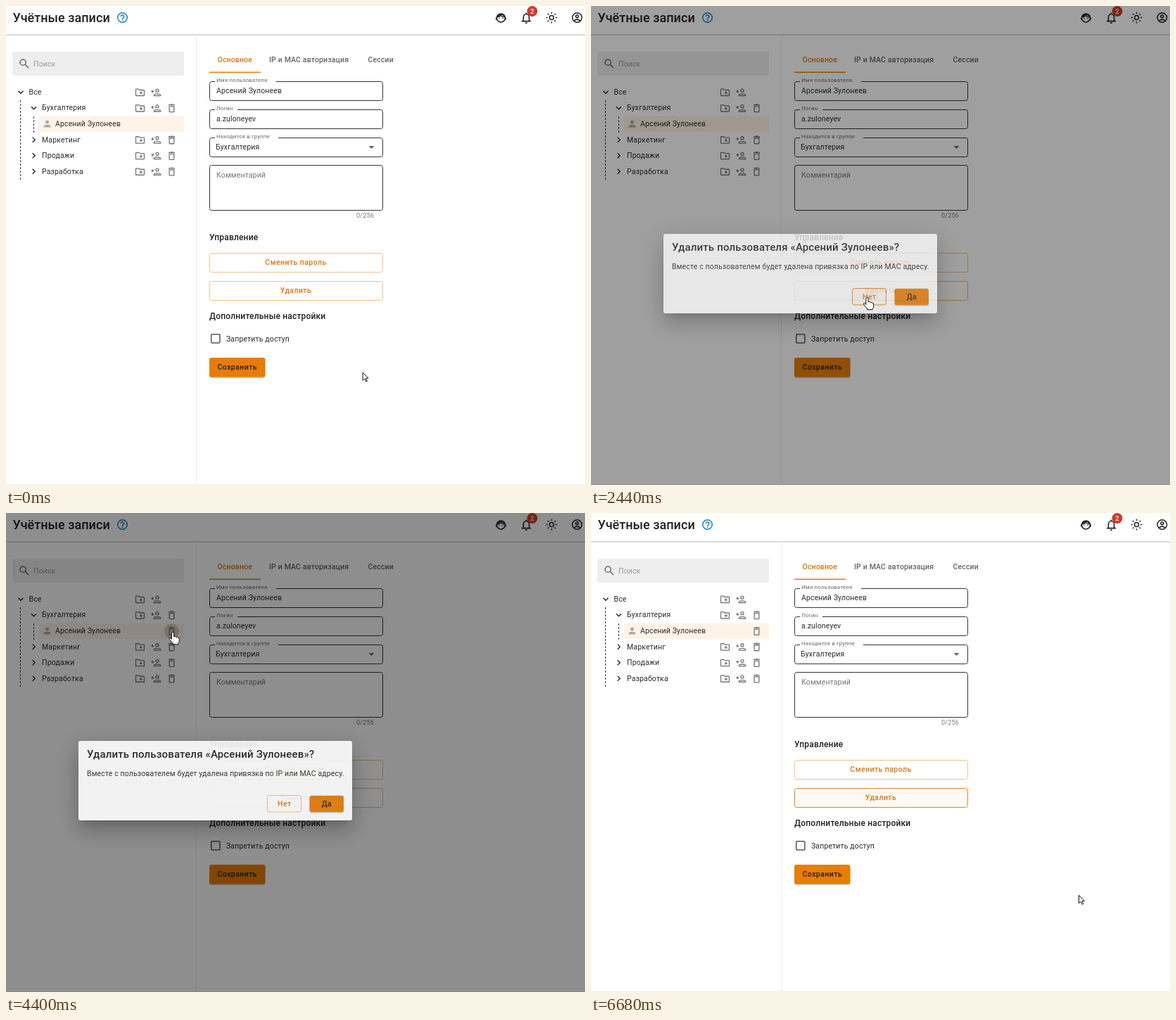
An HTML page for the animation above (6750 ms loop, 823 by 681 pixels).

```html
<!DOCTYPE html>
<html lang="ru">
<head>
<meta charset="utf-8">
<title>Учётные записи</title>
<style>
  html, body { margin: 0; width: 100%; height: 100%; overflow: hidden; background: #fff; }
  svg, #shade { position: absolute; left: 0; top: 0; width: 823px; height: 681px; }
  svg { font-family: Roboto, "Noto Sans", sans-serif; }
  #shade { background: #000; opacity: 0; }
  #dialog { position: absolute; left: 0; top: 0; opacity: 0; }
  #card {
    position: absolute; left: 103px; top: 323.5px; width: 389px; height: 113.5px;
    border-radius: 3px; background: #fff;
    box-shadow: 0 8px 11px -5px rgba(0,0,0,.2), 0 18px 28px 2px rgba(0,0,0,.14), 0 7px 34px 6px rgba(0,0,0,.12);
  }
</style>
</head>
<body>
<svg id="page"></svg>
<div id="shade"></div>
<div id="dialog"><div id="card"></div><svg id="ask"></svg></div>
<svg id="pointer"></svg>
<script>
const LOOP = 6750;
const USER = 'Арсений Зулонеев', LOGIN = 'a.zuloneyev';
const INK = '#2b2b2b', DARK = '#212121', GREY = '#757575', ORANGE = '#e87c06', LINK = '#dc7714';
const $ = id => document.getElementById(id);

const ring = (x, y, r) => `M${x - r} ${y}a${r} ${r} 0 0 0 ${2 * r} 0a${r} ${r} 0 0 0 ${-2 * r} 0`;

// Line icons on a 24 unit grid
const ICONS = {
  folder: 'M3 6V18q0 1 1 1H20q1 0 1-1V8q0-1-1-1H11.5L9.5 5H4q-1 0-1 1zM14 10v6M11 13h6',
  addUser: ring(15, 8, 3) + 'M5 7v6M2 10h6M8 19v-1q0-3 7-3t7 3v1z',
  trash: 'M7 8H17V19q0 1-1 1H8q-1 0-1-1zM5 5H19M9.5 4h5',
  search: ring(9.5, 9.5, 5.5) + 'M14 14L20 20',
  user: ring(12, 8, 3) + 'M5 19v-1q0-3 7-3t7 3v1z',
  down: 'M6.7 9.3L12 14.6 17.3 9.3',
  right: 'M9.3 6.7L14.6 12 9.3 17.3',
  bell: 'M7 18V11a5 5.5 0 0 1 10 0V18M4 18H20M12 3V5M10.5 21h3',
  help: ring(12, 12, 9) + 'M9 10a3 3 0 1 1 4.5 2.6Q12 13.6 12 15M12 16v2',
  account: ring(12, 12, 9) + ring(12, 9.5, 2.5) + 'M6 18q6-5 12 0',
  agent: ring(12, 12.5, 8) + ring(9, 13.5, .3) + ring(15, 13.5, .3) + 'M3 12v4M21 12v4M5 11q5 0 6-4 2 4 8 4M5 10q7-8 14 0',
  sun: ring(12, 12, 4)
};
for (let i = 0; i < 8; i++) {
  const c = Math.cos(i * Math.PI / 4), s = Math.sin(i * Math.PI / 4);
  ICONS.sun += `M${12 + 7.5 * c} ${12 + 7.5 * s}L${12 + 10.5 * c} ${12 + 10.5 * s}`;
}

// Icons are centred on x, y
const icon = (name, x, y, size = 16, color = GREY, attrs = 'fill="none"') =>
  `<path d="${ICONS[name]}" stroke="${color}" stroke-width="2" ${attrs}
    transform="translate(${x - size / 2} ${y - size / 2}) scale(${size / 24})"/>`;

const text = (x, y, str, o = {}) =>
  `<text x="${x}" y="${y}" font-size="${o.size || 10.5}" font-weight="${o.weight || 400}" fill="${o.fill || INK}"
    letter-spacing="${o.gap ?? .14}" text-anchor="${o.anchor || 'start'}">${str}</text>`;

const rect = (x, y, w, h, fill, attrs = '') =>
  `<rect x="${x}" y="${y}" width="${w}" height="${h}" fill="${fill}" ${attrs}/>`;

const label = (x, y, str, fill = LINK) =>
  text(x, y, str, { weight: 500, fill, gap: .42, anchor: 'middle' });

const outline = (x, y, w, h, id = '') =>
  rect(x, y, w, h, '#fff', `id="${id}" rx="3" stroke="#f2c08a"`);

const solid = (x, y, w, h) =>
  rect(x, y + 1.5, w, h, '#000', 'rx="3" opacity=".22"') + rect(x, y, w, h, ORANGE, 'rx="3"');

function field(y, name, notch, value, x = 299) {
  return `<path d="M${notch} ${y}H532.5q3 0 3 3v21q0 3-3 3H292.5q-3 0-3-3v-21q0-3 3-3H297" fill="none" stroke="#333"/>` +
    text(299, y + .8, name, { size: 7.9, gap: .2, fill: '#666' }) + text(x, y + 16.5, value);
}

function group(row, name, x, open) {
  const y = 122.3 + row * 22.55;
  return icon(open ? 'down' : 'right', x - 11.5, y + .2, 16, DARK) + text(x, y + 3.6, name) +
    icon('folder', 190.5, y + .5) + icon('addUser', 213, y + .5) + (row ? icon('trash', 235.5, y + .5) : '');
}

const heading = (y, str) => text(289, y, str, { size: 12, weight: 500, fill: DARK, gap: .17 });
const tab = (x, str, fill = '#666') => text(x, 79.8, str, { weight: 500, fill });

$('page').innerHTML =
  text(9.5, 22.5, 'Учётные записи', { size: 18, weight: 500, gap: .03, fill: DARK }) +
  icon('help', 165.5, 16.5, 18, '#1583cc') + icon('agent', 703.5, 16.5, 18, DARK) +
  icon('bell', 739.5, 16.8, 19.5, DARK) + icon('sun', 775.5, 16.5, 18, DARK) + icon('account', 811.8, 16.5, 18, DARK) +
  '<circle cx="748" cy="7.5" r="7.4" fill="#cf3a2a"/>' +
  text(748, 10.9, '2', { size: 9.5, weight: 500, fill: '#fff', gap: 0, anchor: 'middle' }) +
  rect(0, 40.5, 823, 1, '#b5b5b5') + rect(270, 42, 1, 639, '#ececec') + rect(0, 680, 823, 1, '#efefef') +

  rect(9, 65, 244, 34, '#eee', 'rx="2"') + icon('search', 26, 82, 18, '#666') +
  text(39, 86, 'Поиск', { fill: '#999' }) +
  rect(46.5, 156.5, 206.5, 22.5, '#fff3e8') +
  '<path d="M20.5 134V248M39.5 157V180" stroke="#333" stroke-dasharray="3 2"/>' +
  group(0, 'Все', 32.5, true) + group(1, 'Бухгалтерия', 51, true) +
  ['Маркетинг', 'Продажи', 'Разработка'].map((name, i) => group(i + 3, name, 51)).join('') +
  icon('user', 58.5, 167.5, 15, '#aaa', 'fill="#aaa"') + text(70, 171, USER) +
  '<circle id="halo" cx="235.5" cy="168" r="10.5" opacity=".16"/>' +
  icon('trash', 235.5, 168, 16, GREY, 'fill="none" id="rowTrash"') +

  tab(300.5, 'Основное', LINK) + tab(374, 'IP и MAC авторизация') + tab(514.5, 'Сессии') +
  rect(289, 93.5, 73, 1.5, ORANGE) +
  field(107.5, 'Имя пользователя', 384, USER) + field(147.5, 'Логин', 329, LOGIN) +
  field(187.5, 'Находится в группе', 387, 'Бухгалтерия', 298) +
  '<path d="M515.5 199h8l-4 4z" fill="#666"/>' +
  rect(289.5, 226.5, 246, 64, 'none', 'rx="3" stroke="#333"') +
  text(299, 244, 'Комментарий', { fill: '#777' }) +
  text(523, 301.2, '0/256', { size: 9, fill: '#777', gap: .22, anchor: 'end' }) +
  heading(332.6, 'Управление') +
  outline(289.5, 351.5, 246, 27) + label(412, 368.4, 'Сменить пароль') +
  outline(289.5, 391.5, 246, 27, 'remove') + label(412, 408.4, 'Удалить') +
  heading(444.6, 'Дополнительные настройки') +
  rect(291.7, 466.7, 12.3, 12.3, 'none', 'rx="1.5" stroke="#555" stroke-width="1.5"') +
  text(313, 476.6, 'Запретить доступ') +
  solid(289, 500, 79.5, 27.5) + label(328.8, 516.5, 'Сохранить', DARK);

$('ask').innerHTML =
  text(115, 348.3, `Удалить пользователя «${USER}»?`, { size: 15, weight: 500, gap: .15, fill: DARK }) +
  text(115, 373.6, 'Вместе с пользователем будет удалена привязка по IP или MAC адресу.') +
  outline(371.5, 401.5, 48, 23.5, 'no') +
  '<clipPath id="inNo"><rect x="372" y="402" width="47" height="23" rx="3"/></clipPath>' +
  `<circle id="ripple" cx="403" cy="411" fill="${ORANGE}" opacity=".2" clip-path="url(#inNo)"/>` +
  label(395.8, 416.7, 'Нет') + solid(431.5, 401.8, 48.5, 23.2) + label(455.9, 416.7, 'Да', DARK);

$('pointer').innerHTML = `
  <g fill="#fff" stroke="#111" stroke-linejoin="round">
    <path id="arrow" d="M.5.5V11.8L3.2 9.4 5.2 13.5 6.9 12.7 5 8.7H8.4Z"/>
    <path id="hand" d="M-1.6 10V1.4a1.6 1.6 0 0 1 3.2 0V6.2q2.6-1 3 .8 2.4-.8 2.8 1 1.8-.4 1.8 1.6V12.5q0 2-1.4 3.5V17.2H.2V15.6Q-2 13.6-4.8 9.6-5.6 7.8-4 7.8-2.8 8-1.6 10Z"/>
    <path id="beam" fill="none" stroke="#a8683a" d="M-2.5-6h5M0-6V6M-2.5 6h5"/>
  </g>`;

const part = (t, from, length) => Math.min(1, Math.max(0, (t - from) / length));

// Each move glides to a point, optionally bent towards a second one
const HOME = [507, 521];
const MOVES = [
  { from: 0, to: 540, end: [392, 397] },
  { from: 1770, to: 2040, end: [392.5, 414.5] },
  { from: 3000, to: 3610, end: [44, 168], bend: [391, 172] },
  { from: 3690, to: 4010, end: [237, 169.5] },
  { from: 4750, to: 5470, end: [403, 409], bend: [-196, 300] },
  { from: 6300, to: 6680, end: [693, 543] }
];

function cursor(t) {
  let pos = HOME;
  for (const { from, to, end, bend = end } of MOVES) {
    if (t < from) break;
    const s = 1 - (1 - part(t, from, to - from)) ** 2;
    const mid = bend === end ? pos.map((v, i) => (v + end[i]) / 2) : bend;
    pos = pos.map((v, i) => (1 - s) ** 2 * v + 2 * s * (1 - s) * mid[i] + s * s * end[i]);
  }
  return pos;
}

const dialogFade = (t, open, close) =>
  (1 - (1 - part(t, open, 350)) ** 4) * (1 - part(t, close, 400)) ** 2.5;

const mix = (a, b, k) => `rgb(${a.map((v, i) => Math.round(v + (b[i] - v) * k))})`;

function tint(id, k) {
  $(id).setAttribute('stroke', mix([242, 192, 138], [224, 132, 42], k));
  $(id).setAttribute('fill', mix([255, 255, 255], [255, 249, 243], k));
}

function draw(t) {
  const fade = dialogFade(t, 680, 2398) + dialogFade(t, 4255, 6280);
  const modal = fade > .95;
  const [x, y] = cursor(t);
  const over = (left, top, right, bottom) => x > left && x < right && y > top && y < bottom;
  const overNo = fade > .5 && over(372, 402, 420, 425);
  const overLink = !modal && (over(289, 391, 536, 419) || over(40, 156, 253, 180));
  const overText = !modal && over(280, 187, 536, 291);

  $('shade').style.opacity = fade * .5;
  $('dialog').style.opacity = fade;
  tint('remove', part(t, 330, 200) * (1 - fade));
  tint('no', overNo ? 1 : 0);
  $('halo').setAttribute('visibility', !modal && over(225, 158, 246, 179) ? 'visible' : 'hidden');
  $('rowTrash').setAttribute('visibility', t > 3400 ? 'visible' : 'hidden');
  $('ripple').setAttribute('r', Math.max(0, t - 6240) * .27);

  const shape = overNo || overLink ? 'hand' : overText ? 'beam' : 'arrow';
  for (const id of ['arrow', 'hand', 'beam']) {
    $(id).setAttribute('visibility', id === shape ? 'visible' : 'hidden');
    $(id).setAttribute('transform', `translate(${x} ${y})`);
  }
}

const start = performance.now();
function tick() {
  draw((performance.now() - start) % LOOP);
  requestAnimationFrame(tick);
}
tick();
</script>
</body>
</html>
```
